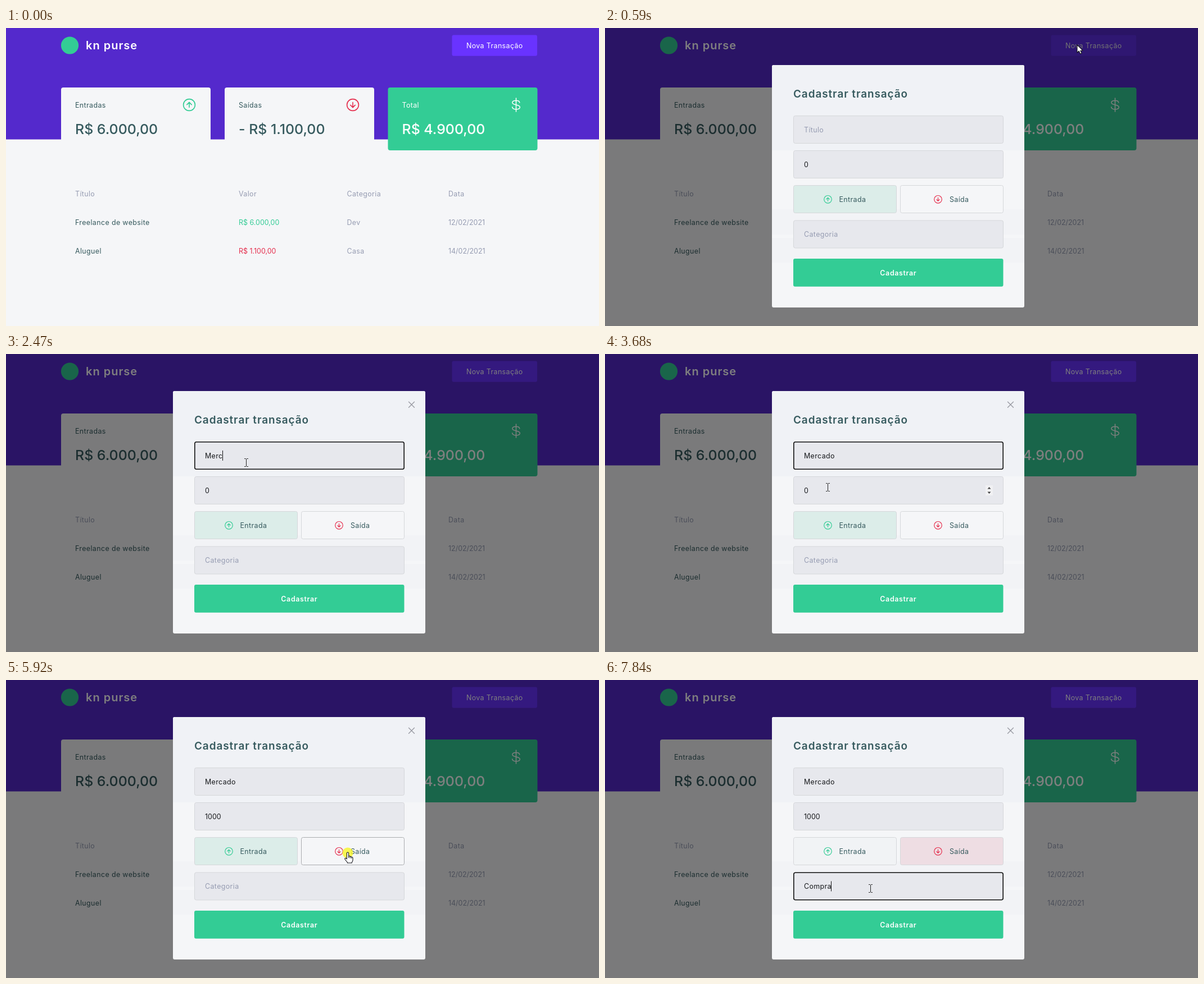
Recreate the animation shown at these times as an HTML page with a canvas. Size 1055x531 px, loop 8 s.

```html
<!DOCTYPE html>
<html lang="pt-BR">
<head>
<meta charset="utf-8">
<title>Controle de transações</title>
<style>
html, body { margin: 0; width: 100%; height: 100%; overflow: hidden; background: #f5f6f8; }
canvas { display: block; width: 1055px; height: 531px; }
</style>
</head>
<body>
<canvas id="stage" width="1055" height="531"></canvas>
<script>
const ctx = document.getElementById('stage').getContext('2d');
const LOOP = 8000;
const BODY = 12.45;
const GREEN = '#33cc95', RED = '#e52e4d', INK = '#365a5e', MUTED = '#969cb2', PAPER = '#f5f6f8';
const MODAL_OPEN = 590;

// Pointer waypoints: time, x, y
const path = [
  [90, 720, 545], [400, 840, 30], [690, 840, 30], [830, 674, 82], [870, 630, 165],
  [1000, 560, 232], [1130, 443, 228], [1240, 427, 193], [3250, 427, 193],
  [3650, 400, 236], [3940, 358, 249], [4470, 358, 249], [4670, 492, 275],
  [4820, 549, 308], [5030, 566, 333], [5250, 575, 331], [5700, 608, 308],
  [6060, 608, 308], [6290, 472, 371]
];
const clicks = [[400, 510], [1220, 1340], [3940, 4100], [5890, 6060], [6270, 6380]];

const titleKeys = [1780, 2080, 2250, 2470, 2640, 2810, 2920];
const valueKeys = [4260, 4470, 4900];
const categoryKeys = [7030, 7230, 7360, 7600, 7640, 7840];
const focusSpans = { title: [1240, 3940], value: [3940, 5890], category: [6290, LOOP] };
const caretMarks = [...titleKeys, ...valueKeys, ...categoryKeys, ...Object.values(focusSpans).map(s => s[0])];

const between = (t, [from, to]) => t >= from && t < to;
const typedCount = (keys, t) => keys.filter(k => k <= t).length;

function pointerAt(t) {
  if (t < path[0][0]) return null;
  const next = path.findIndex(p => p[0] > t);
  if (next < 0) return path[path.length - 1].slice(1);
  const [t0, x0, y0] = path[next - 1], [t1, x1, y1] = path[next];
  const k = (t - t0) / (t1 - t0);
  return [Math.round(x0 + (x1 - x0) * k), Math.round(y0 + (y1 - y0) * k)];
}

function text(str, x, y, color, { size = BODY, weight = 400, align = 'left' } = {}) {
  const tracking = /\d/.test(str) ? 0 : weight === 600 ? 0.05 : 0.03;
  ctx.font = `${weight} ${size}px Inter, "Open Sans", sans-serif`;
  ctx.letterSpacing = size * tracking + 'px';
  ctx.textAlign = align;
  ctx.fillStyle = color;
  ctx.fillText(str, x, y);
}

function box(x, y, w, h, r, fill, stroke, width = 1) {
  ctx.beginPath();
  ctx.roundRect(x, y, w, h, r);
  if (fill) { ctx.fillStyle = fill; ctx.fill(); }
  if (stroke) { ctx.strokeStyle = stroke; ctx.lineWidth = width; ctx.stroke(); }
}

function disc(x, y, r, fill) {
  ctx.beginPath();
  ctx.arc(x, y, r, 0, Math.PI * 2);
  ctx.fillStyle = fill;
  ctx.fill();
}

function strokePath(x, y, d, color, width, scale = 1) {
  ctx.save();
  ctx.translate(x, y);
  ctx.scale(scale, scale);
  ctx.strokeStyle = color;
  ctx.lineWidth = width / scale;
  ctx.lineCap = ctx.lineJoin = 'round';
  ctx.stroke(new Path2D(d));
  ctx.restore();
}

function arrowIcon(x, y, r, color, up) {
  const s = up ? -1 : 1;
  const d = `M10 0A10 10 0 1 1 -10 0A10 10 0 1 1 10 0M0 -4.2V4.2M-4 ${s * 0.4}L0 ${s * 4.4}L4 ${s * 0.4}`;
  strokePath(x, y, d, color, r > 8 ? 1.6 : 1.2, r / 10);
}

function summaryCard(x, label, value, fill, color) {
  box(x, 106, 266, 112, 4, fill);
  text(label, x + 25, 142, color);
  text(value, x + 25, 189, color, { size: 24.9, weight: 500 });
}

function tableRow(y, cells, colors) {
  [123, 414, 606.5, 787].forEach((x, i) => text(cells[i], x, y, colors[i]));
}

function page(hover) {
  ctx.fillStyle = PAPER;
  ctx.fillRect(0, 0, 1055, 531);
  ctx.fillStyle = '#5429cc';
  ctx.fillRect(0, 0, 1055, 198.5);
  disc(113.5, 31, 15.6, GREEN);
  text('kn purse', 142, 37.5, '#fff', { size: 20, weight: 600 });
  box(793.5, 12.5, 151.5, 37.3, 3, hover ? '#5e2ee5' : '#6933ff');
  text('Nova Transação', 869.3, 36, hover ? '#e6e6e6' : '#fff', { align: 'center' });

  summaryCard(98, 'Entradas', 'R$ 6.000,00', PAPER, INK);
  arrowIcon(326, 137, 10.4, GREEN, true);
  summaryCard(389, 'Saídas', '- R$ 1.100,00', PAPER, INK);
  arrowIcon(617, 137, 10.4, RED, false);
  summaryCard(679.5, 'Total', 'R$ 4.900,00', GREEN, '#fff');
  strokePath(907.5, 137, 'M0 -12V12M6.3 -4C6 -7 3.5 -7.8 0 -7.8C-4 -7.8 -6.6 -6.6 -6.6 -4C-6.6 1.2 6.8 -1.2 6.8 4C6.8 6.7 4 7.9 0 7.9C-4 7.9 -6.6 6.6 -6.8 3.8', '#fff', 1.5);

  tableRow(300, ['Título', 'Valor', 'Categoria', 'Data'], Array(4).fill(MUTED));
  tableRow(350.5, ['Freelance de website', 'R$ 6.000,00', 'Dev', '12/02/2021'], [INK, GREEN, MUTED, MUTED]);
  tableRow(401.5, ['Aluguel', 'R$ 1.100,00', 'Casa', '14/02/2021'], [INK, RED, MUTED, MUTED]);
}

function field(y, value, placeholder, focused, caretIndex, caretOn) {
  box(335.5, y + 0.5, 373, 49, 3, '#e7e8ed', '#d5d7da');
  if (focused) box(335.8, y + 0.8, 372.4, 48.4, 3, null, '#101010', 1.6);
  text(value || placeholder, 354, y + 29.5, value ? '#17191c' : MUTED);
  if (!focused || !caretOn) return;
  const x = 354 + ctx.measureText(value.slice(0, caretIndex)).width;
  ctx.fillStyle = '#111';
  ctx.fillRect(Math.floor(x), y + 16, 1, 18);
}

function spinner() {
  ctx.fillStyle = '#f1f1f3';
  ctx.fillRect(677, 234, 13, 18);
  ctx.fillStyle = '#444';
  ctx.fill(new Path2D('M680.5 240.5L683.5 237L686.5 240.5ZM680.5 245.5L683.5 249L686.5 245.5Z'));
}

function typeButton(x, label, iconX, labelX, color, up, fill, hover) {
  box(x + 0.5, 280.5, 183, 49, 3, fill, hover ? '#aaacaf' : '#d5d7da');
  arrowIcon(iconX, 305.3, 6.8, color, up);
  text(label, labelX, 310, INK);
}

// Draws the dialog and returns the pointer shape that fits what lies under it.
function modal(t, [px, py]) {
  const inColumn = px > 335 && px < 709;
  const over = (top, bottom) => inColumn && py > top && py < bottom;
  const titleLen = typedCount(titleKeys, t);
  const valueLen = typedCount(valueKeys, t);
  const categoryLen = typedCount(categoryKeys, t);
  const focus = name => between(t, focusSpans[name]);
  // The caret restarts its 500 ms blink after each key or focus change.
  const lastMark = Math.max(0, ...caretMarks.filter(m => m <= t));
  const caretOn = Math.floor((t - lastMark) / 500) % 2 === 0;

  ctx.fillStyle = 'rgba(0,0,0,.5)';
  ctx.fillRect(0, 0, 1055, 531);
  box(297, 66, 449, 432, 3, PAPER);
  box(297, 66, 449, 152, [3, 3, 0, 0], '#f0f2f6');
  ctx.fillStyle = '#f2f3f6';
  ctx.fillRect(297, 323, 449, 45);
  ctx.fillRect(297, 374, 449, 44);
  if (t >= 630) strokePath(721.5, 90.3, 'M-5 -5L5 5M5 -5L-5 5', '#9a9ca4', 1.4);

  text('Cadastrar transação', 335, 124, INK, { size: 18.9, weight: 600 });
  field(156, 'Mercado'.slice(0, titleLen), 'Título', focus('title'), titleLen, caretOn);
  field(218, '100'.slice(0, valueLen) + '0', '', focus('value'), valueLen, caretOn);
  if (focus('value') || over(218, 268)) spinner();

  const expense = t >= 6000;
  const onButtons = over(280, 330);
  typeButton(335, 'Entrada', 396.5, 416.5, GREEN, true, expense ? '#f1f3f5' : '#dcede9', onButtons && px < 519);
  typeButton(525, 'Saída', 592.5, 613, RED, false, expense ? '#eedde3' : PAPER, onButtons && px > 525);

  field(342.5, 'Compra'.slice(0, categoryLen), 'Categoria', focus('category'), categoryLen, caretOn);
  box(335, 411, 373.5, 49.8, 3, GREEN);
  text('Cadastrar', 521.8, 441, '#fff', { weight: 600, align: 'center' });

  if (over(156, 206) || over(218, 268) || over(342, 392)) return 'beam';
  return onButtons ? 'hand' : 'arrow';
}

function drawPointer([x, y], kind) {
  if (kind === 'beam') {
    strokePath(x + 0.5, y + 0.5, 'M-3 -7H-1L0 -6L1 -7H3M0 -6V6M-3 7H-1L0 6L1 7H3', '#222', 1);
    return;
  }
  const shape = new Path2D(kind === 'hand'
    ? 'M-1.6 0Q0 -2 1.6 0V6Q3 4.8 4.2 6.6Q6 5.8 6.8 7.6Q8.6 7 9 9V13Q9 15 7.2 17V18H-.6V17L-5 11.5Q-5.6 9 -3.6 9.4L-1.6 11Z'
    : 'M0 0V14L3.2 11L5.5 16L8 15L5.8 10.2H10Z');
  ctx.save();
  ctx.translate(x, y);
  ctx.fillStyle = '#fff';
  ctx.strokeStyle = '#15151c';
  ctx.lineWidth = 1.1;
  ctx.lineJoin = 'round';
  ctx.fill(shape);
  ctx.stroke(shape);
  if (kind === 'hand') ctx.stroke(new Path2D('M1.6 6V9M4.2 7V9.5M6.8 8V10'));
  ctx.restore();
}

function draw(now) {
  const t = now % LOOP;
  const pointer = pointerAt(t);
  page(between(t, [385, 630]));
  const kind = t >= MODAL_OPEN ? modal(t, pointer) : 'arrow';
  if (pointer) {
    if (clicks.some(span => between(t, span))) disc(...pointer, 9.5, 'rgba(247,245,35,.78)');
    drawPointer(pointer, kind);
  }
  requestAnimationFrame(draw);
}
requestAnimationFrame(draw);
</script>
</body>
</html>
```
